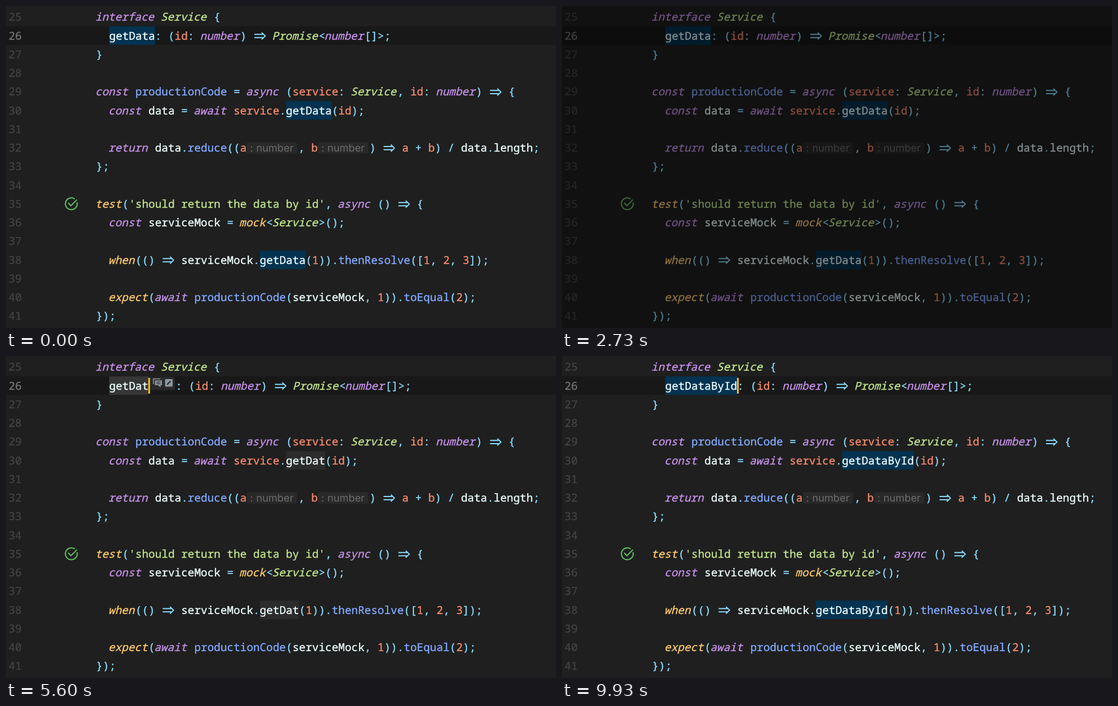
These frames come from a looping animation (977x573 px, 9990 ms). An HTML page:

```html
<!DOCTYPE html>
<html lang="en">
<head>
<meta charset="utf-8">
<title>Rename in the editor</title>
<style>
html, body { margin: 0; width: 100%; height: 100%; overflow: hidden; background: #1f1f1f; }
svg { display: block; width: 977px; height: 573px; }
text { white-space: pre; text-rendering: geometricPrecision; }
.code { font: 19.383px "Noto Sans Mono", monospace; font-variant-ligatures: none; }
.code text { stroke-width: .35; }
.code .hint { font: 18.3px Inter, sans-serif; fill: #6c6c6c; stroke: none; }
.it { font-style: italic; }
</style>
</head>
<body>
<svg viewBox="0 0 977 573">
  <rect width="977" height="573" fill="#1f1f1f"/>
  <rect y="36.2" width="977" height="33" fill="#181818"/>
  <g id="numbers" class="code"></g>
  <g fill="none" stroke="#5fb560" stroke-width="2.2" stroke-linecap="round" stroke-linejoin="round">
    <path d="M121.3 342.8A10.5 10.5 0 1 0 126.4 350.2"/>
    <path d="M111 350.8L115.3 355.6L125.4 345.2"/>
  </g>
  <g id="code" class="code"></g>
  <rect id="caret" y="39" width="3" height="28" fill="#ffc21a"/>
  <rect id="dim" width="977" height="573" fill="#000" opacity="0"/>
</svg>
<script>
const LOOP = 9990, COL = 11.63, LEFT = 160, PITCH = 33.25, FIRST = 25;
const HINT = 91.5, TOOLS = 48.2, BLINK = 1060, SLANT = 1.5;

// @ is the renamed symbol, ^ the rename buttons, # a type hint
const lines = [
  "interface Service {",
  "  @^: (id: number) => Promise<number[]>;",
  "}",
  "",
  "const productionCode = async (service: Service, id: number) => {",
  "  const data = await service.@(id);",
  "",
  "  return data.reduce((a#, b#) => a + b) / data.length;",
  "};",
  "",
  "test('should return the data by id', async () => {",
  "  const serviceMock = mock<Service>();",
  "",
  "  when(() => serviceMock.@(1)).thenResolve([1, 2, 3]);",
  "",
  "  expect(await productionCode(serviceMock, 1)).toEqual(2);",
  "});"
];

const rules = [
  [/^(interface|const|async|await|return|number)$/, "#c792ea", true],
  [/^(Service|Promise)$/, "#c3e88d", true],
  [/^(test|when|expect|mock)$/, "#ffcb6b", true],
  [/^(productionCode|reduce|thenResolve|toEqual)$/, "#82aaff"],
  [/^(service|id|a|b|\d)$/, "#f78c6c"],
  [/^'/, "#c3e88d"],
  [/^\w/, "#eeffff"],
  [/./, "#89ddff"]
];

// Each step: time, symbol name, whether the rename box is open
const steps = [
  [45, "getData", false],
  [3200, "getData", true],
  [3900, "g", true], [4070, "ge", true], [4250, "get", true],
  [5200, "getD", true], [5340, "getDa", true], [5480, "getDat", true], [5620, "getData", true],
  [6200, "getDataB", true], [6350, "getDataBy", true],
  [6800, "getDataByI", true], [6940, "getDataById", true],
  [7310, "getDataById", false]
];

const byId = id => document.getElementById(id);
const escape = s => s.replace(/&/g, "&amp;").replace(/</g, "&lt;");
const rect = (x, y, w, h, fill, r = 0) =>
  `<rect x="${x}" y="${y}" width="${w}" height="${h}" rx="${r}" fill="${fill}"/>`;
const label = (x, y, s, fill, italic) =>
  `<text x="${italic ? x - SLANT : x}" y="${y}" fill="${fill}" stroke="${fill}"${italic ? ' class="it"' : ""}>${escape(s)}</text>`;

function arrow(x, y) {
  return `<path transform="translate(${x} ${y - 6.3})" fill="none" stroke="#89ddff" stroke-width="1.9"
    d="M2 -2.9H18M2 2.9H18M15 -6.2L21.4 0L15 6.2"/>`;
}

function hint(x, y) {
  return rect(x, y - 17, HINT - 2, 20.5, "#292929", 4) +
    `<text class="hint" x="${x + 6}" y="${y}">:</text><text class="hint" x="${x + 17}" y="${y}">number</text>`;
}

function tools(x) {
  return rect(x, 37, 47, 23.5, "#292929", 3) +
    `<g transform="translate(${x + 8} 40)">
      <path fill="none" stroke="#8b979e" stroke-width="1.6" d="M.8 10V.8H13"/>
      <path fill="#8b979e" d="M3.5 3.5H16V12H13.5V16L9.5 12H3.5Z"/>
      <path stroke="#292929" stroke-width="1.3" d="M6 6.3H13.5M6 9.3H13.5"/>
      <rect x="21.5" y="1" width="13.5" height="13.5" rx="1.5" fill="#8b979e"/>
      <path stroke="#292929" stroke-width="2.2" d="M25 11L31.5 4.5"/>
    </g>`;
}

function drawLine(src, row, name, open) {
  const y = 26.4 + row * PITCH;
  let x = LEFT, out = "";
  for (const tok of src.match(/'[^']*'|=>|\w+|\s+|[@#^]|[^\w\s]/g) || []) {
    if (tok === "#") {
      out += hint(x, y);
      x += HINT;
    } else if (tok === "^") {
      if (open) {
        out += tools(x);
        x += TOOLS;
      }
    } else if (tok === "@") {
      const w = name.length * COL;
      const fill = !open ? "#033350" : row === 1 ? "#363636" : "#2c2c2c";
      out += rect(x, 3 + row * PITCH, w, PITCH - .3, fill) + label(x, y, name, "#eeffff");
      x += w;
    } else {
      if (tok === "=>") out += arrow(x, y);
      else if (tok.trim()) {
        const [, fill, italic] = rules.find(r => r[0].test(tok));
        out += label(x, y, tok, fill, italic);
      }
      x += tok.length * COL;
    }
  }
  return out;
}

byId("numbers").innerHTML = lines.map((_, i) =>
  label(4.5, 26.4 + i * PITCH, String(FIRST + i), i === 1 ? "#737373" : "#424242")).join("");

const ramp = (t, from, to) => Math.min(1, Math.max(0, (t - from) / (to - from)));
let shown = null;

function draw(t) {
  const step = steps.filter(s => s[0] <= t).pop() || steps[0];
  const [start, name, open] = step;
  if (step !== shown) {
    byId("code").innerHTML = lines.map((s, i) => drawLine(s, i, name, open)).join("");
    shown = step;
  }
  const col = start < 3900 ? 7 : 2 + name.length;
  const lit = t >= start && (t - start) % BLINK < BLINK / 2;
  byId("caret").setAttribute("x", LEFT + col * COL - .3);
  byId("caret").setAttribute("visibility", lit ? "visible" : "hidden");
  byId("dim").setAttribute("opacity", .45 * (ramp(t, 1740, 1960) - ramp(t, 2740, 2960)));
}

const origin = performance.now();
function tick() {
  draw((performance.now() - origin) % LOOP);
  requestAnimationFrame(tick);
}
draw(0);
requestAnimationFrame(tick);
</script>
</body>
</html>
```
